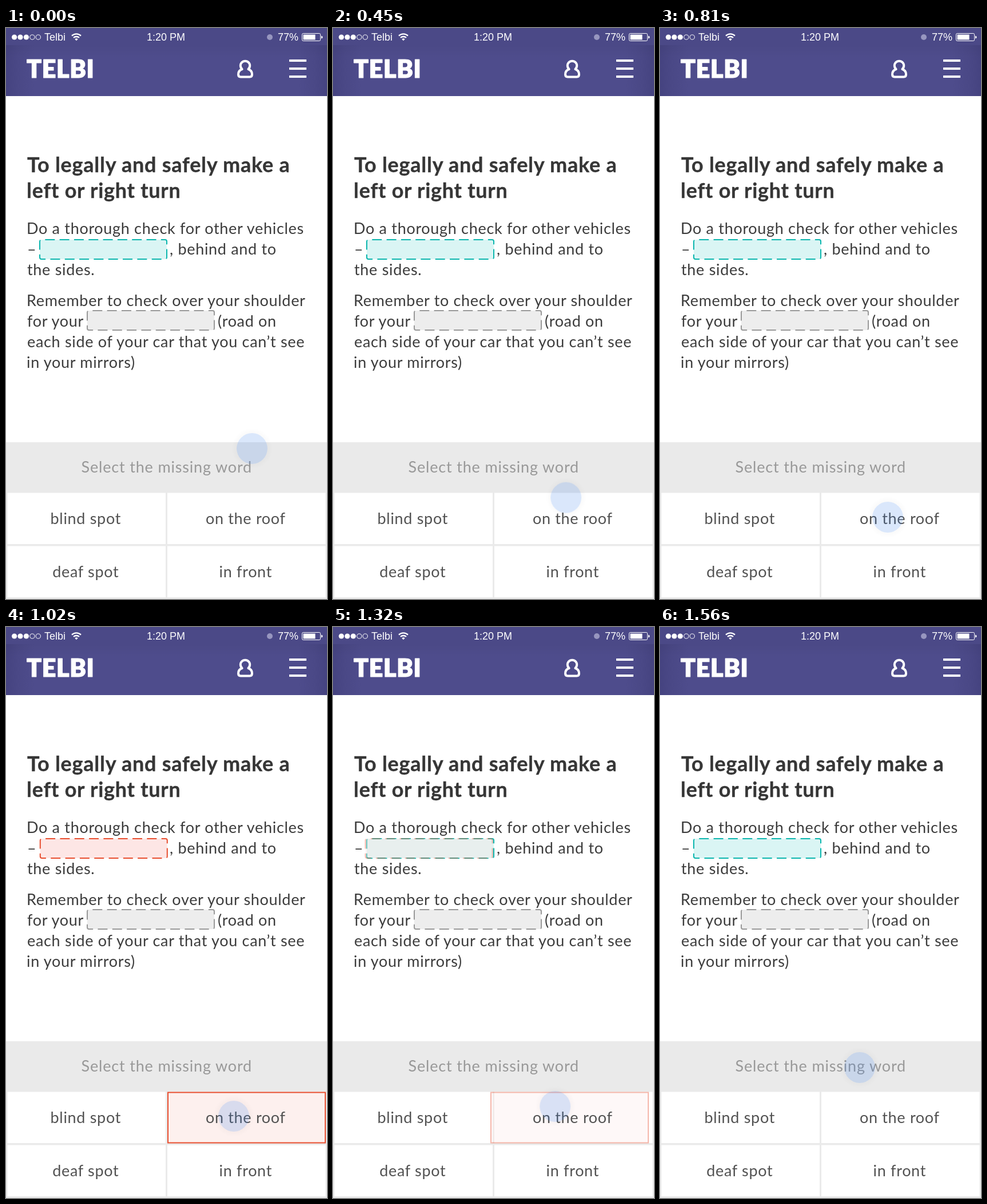
An HTML page that plays this animation: 561 by 998 pixels, repeating every 6.5 s.

```html
<!DOCTYPE html>
<html lang="en">
<head>
<meta charset="utf-8">
<title>Fill in the missing word</title>
<style>
  html, body { margin: 0; width: 100%; height: 100%; overflow: hidden; background: #fff; }
  svg { display: block; width: 100vw; height: 100vh; }
  text { font: 400 27px Lato, "Open Sans", sans-serif; letter-spacing: .68px; fill: #3c3c3c; }
  .mid { text-anchor: middle; }
  .title text { font-size: 36px; font-weight: 700; letter-spacing: .74px;
                fill: #363636; stroke: #363636; stroke-width: .35; }
  .status text { font: 18px "Liberation Sans", Arial, sans-serif; letter-spacing: 0; fill: #fff; }
  .brand { font-size: 43px; font-weight: 900; letter-spacing: .6px; fill: #fff;
           stroke: #fff; stroke-width: 1.2; stroke-linejoin: round; }
  .prompt { fill: #999; letter-spacing: .82px; }
  .choices text { fill: #525252; }
  .blank { stroke-width: 2; stroke-dasharray: .67 .33; stroke-dashoffset: -.25; }
  .teal { fill: #daf5f4; stroke: #0bb6ae; }
  .gray { fill: #ededed; stroke: #999; }
  .red { fill: #fde6e5; stroke: #e84e2f; }
  .line { fill: none; stroke: #fff; }
</style>
</head>
<body>
<svg viewBox="0 0 561 998" preserveAspectRatio="none">
  <defs>
    <linearGradient id="bar">
      <stop offset="0" stop-color="#454380"/>
      <stop offset=".035" stop-color="#4a4886"/>
      <stop offset=".09" stop-color="#4e4c8c"/>
      <stop offset=".91" stop-color="#4e4c8c"/>
      <stop offset=".965" stop-color="#4a4886"/>
      <stop offset="1" stop-color="#454380"/>
    </linearGradient>
    <linearGradient id="shade" x2="0" y2="1">
      <stop offset="0" stop-opacity=".04"/>
      <stop offset="1" stop-opacity="0"/>
    </linearGradient>
    <radialGradient id="halo">
      <stop offset=".75" stop-opacity="0"/>
      <stop offset=".76" stop-opacity=".02"/>
      <stop offset="1" stop-opacity="0"/>
    </radialGradient>
  </defs>

  <rect width="561" height="998" fill="#fff"/>
  <rect width="561" height="119" fill="url(#bar)"/>
  <rect y="30" width="561" height="22" fill="url(#shade)"/>
  <rect width="561" height="30" fill="#4b4987"/>

  <g class="status">
    <g fill="#fff">
      <circle cx="14.6" cy="16" r="4.6"/>
      <circle cx="25" cy="16" r="4.6"/>
      <circle cx="35.4" cy="16" r="4.6"/>
    </g>
    <g class="line">
      <circle cx="45.9" cy="16" r="4.1"/>
      <circle cx="56.3" cy="16" r="4.1"/>
      <path stroke-width="2.3" d="M115 13.6a11.5 11.5 0 0 1 16 0M118 17a7.2 7.2 0 0 1 10 0"/>
    </g>
    <path d="M123 22.3l-2.7-2.8a3.8 3.8 0 0 1 5.4 0z" fill="#fff"/>
    <text x="67" y="22">Telbi</text>
    <text x="279.5" y="22" class="mid">1:20 PM</text>
    <circle cx="461" cy="16" r="5" fill="#9796bf"/>
    <text x="475" y="22">77%</text>
    <rect class="line" x="517.5" y="9.5" width="32" height="13" rx="2"/>
    <rect x="519.5" y="11.5" width="21" height="9" fill="#fff"/>
    <path d="M551 13.5q2.5 .5 2.5 2.5t-2.5 2.5z" fill="#fff"/>
  </g>

  <text class="brand" x="36" y="86.5">TELBI</text>
  <path class="line" stroke-width="4" stroke-linejoin="round"
    d="M412.6 72A8.2 8.2 0 1 1 423.4 72C428 73.5 430 77 430 81Q430 85.5 426 85.5H410Q406 85.5 406 81C406 77 408 73.5 412.6 72Z"/>
  <path class="line" stroke-width="4" d="M495 57h30M495 71h30M495 85h30"/>

  <g class="title">
    <text x="37" y="252">To legally and safely make a</text>
    <text x="36" y="297">left or right turn</text>
  </g>
  <g>
    <text x="36" y="360">Do a thorough check for other vehicles</text>
    <text x="37" y="396">–</text>
    <text x="286" y="396">, behind and to</text>
    <text x="37" y="432">the sides.</text>
    <text x="36" y="486">Remember to check over your shoulder</text>
    <text x="37" y="522">for your</text>
    <text x="370" y="522">(road on</text>
    <text x="37" y="558">each side of your car that you can’t see</text>
    <text x="36" y="594">in your mirrors)</text>
  </g>

  <rect id="ready" class="blank teal" x="59" y="370" width="222" height="34" rx="3" pathLength="20"/>
  <g id="wrongBlank">
    <rect class="blank red" x="59.8" y="370" width="222" height="34" rx="3" pathLength="20"/>
  </g>
  <rect class="blank gray" x="142" y="494" width="222" height="34" rx="3" pathLength="20"/>

  <rect y="724" width="561" height="274" fill="#eaeaea"/>
  <text class="prompt mid" x="280.8" y="777">Select the missing word</text>
  <path fill="#fff" d="M2.5 812.5H279V902H2.5zM282 812.5h276.5V902H282zM2.5 905.5H279V995H2.5zM282 905.5h276.5V995H282z"/>
  <g id="wrongCell">
    <rect x="283" y="813.5" width="275" height="88" fill="#fdf0ee" stroke="#e84e2f" stroke-width="2"/>
  </g>
  <g class="choices mid">
    <text x="139.3" y="867">blind spot</text>
    <text x="418.8" y="867">on the roof</text>
    <text x="139.3" y="960">deaf spot</text>
    <text x="418.8" y="960">in front</text>
  </g>

  <g id="touch">
    <circle r="36" fill="url(#halo)"/>
    <circle r="27" fill="#3c81ea" fill-opacity=".19"/>
  </g>
</svg>
<script>
  const LOOP = 6500, TICK = 30;

  // steps: [time in ms, value]; values advance linearly once per tick
  function play(id, prop, steps, format = v => v) {
    const table = [...steps, [LOOP, steps[steps.length - 1][1]]];
    const frames = table.map(([time, value], i) => {
      const next = table[i + 1];
      const count = next ? Math.max(1, Math.round((next[0] - time) / TICK)) : 1;
      return { offset: time / LOOP, [prop]: format(value), easing: `steps(${count}, end)` };
    });
    document.getElementById(id).animate(frames, { duration: LOOP, iterations: Infinity });
  }

  const move = ([x, y]) => `translate(${x}px, ${y}px)`;
  const sway = scale => v => move([v * scale, 0]);

  const path = [
    [0, [430, 735]], [630, [398, 855]],
    [1260, [398, 855]], [1560, [349, 770]]
  ];
  const error = [[0, 0], [840, 0], [960, 1], [1230, 1], [1380, 0]];
  const ready = [[0, 1], [930, 1], [960, 0], [1200, 0], [1230, 1]];
  const shake = [[0, 0], [1020, 0], [1080, 7], [1140, -7], [1200, 7], [1260, -7]];

  play("touch", "transform", path, move);
  play("ready", "opacity", ready);
  play("wrongBlank", "opacity", error);
  play("wrongCell", "opacity", error);
  play("wrongBlank", "transform", shake, sway(.45));
  play("wrongCell", "transform", shake, sway(1));
</script>
</body>
</html>
```
